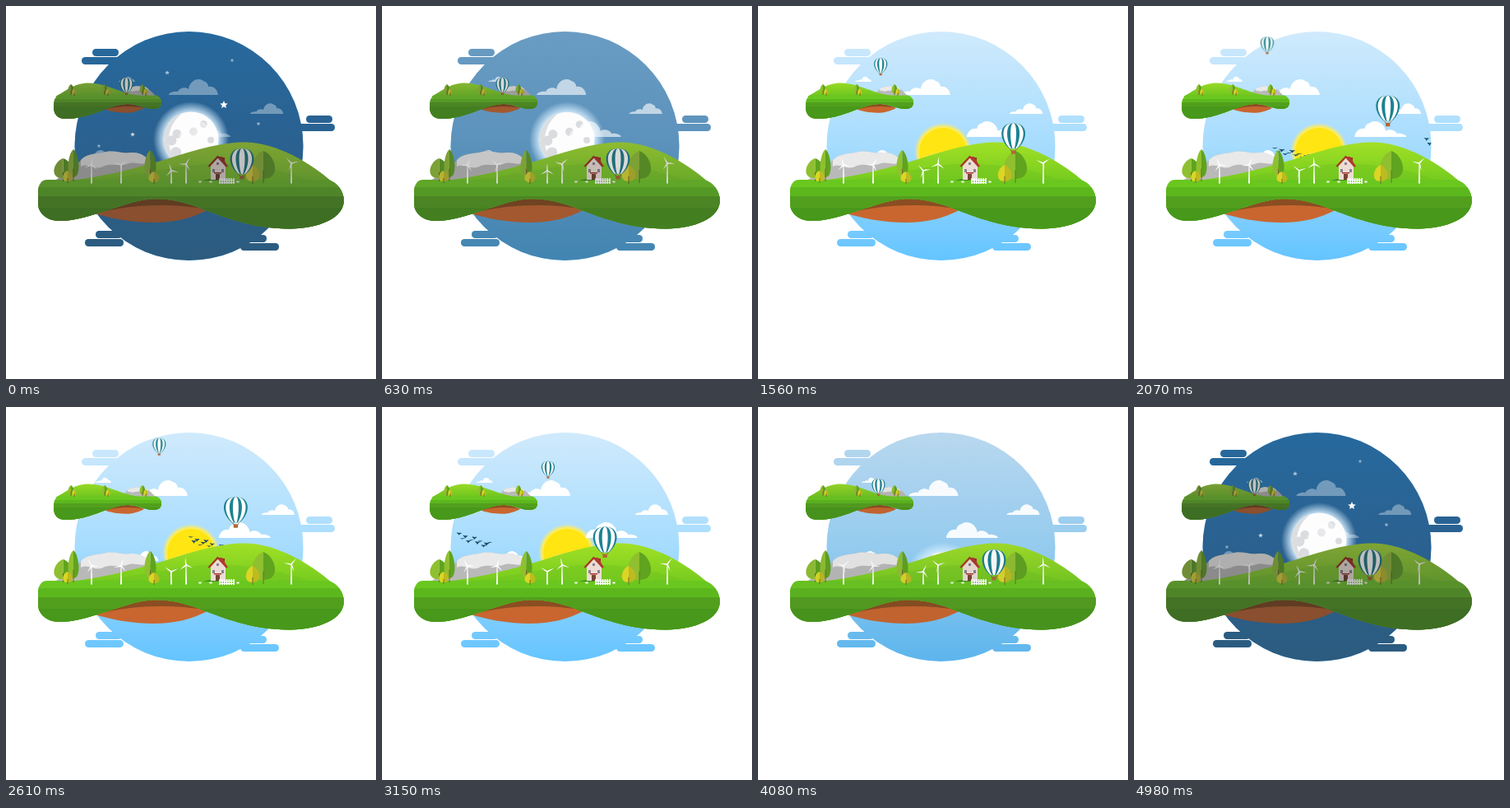
An HTML page that plays this animation: 450x453 px, repeating every 5010 ms.

```html
<!DOCTYPE html>
<html lang="en">
<head>
<meta charset="utf-8">
<title>Floating islands</title>
<style>
  html, body { margin: 0; height: 100%; overflow: hidden; background: #fff; }
  svg { display: block; width: 100%; height: 100%; }
</style>
</head>
<body>
<svg id="stage" viewBox="0 0 450 453"></svg>
<script>
const LOOP = 5010;
const stage = document.getElementById('stage');

// ---- Drawing helpers ----
const path = (d, fill, extra = '') => `<path d="${d}" fill="${fill}" ${extra}/>`;
const rect = (x, y, w, h, fill, extra = '') =>
  `<rect x="${x}" y="${y}" width="${w}" height="${h}" fill="${fill}" ${extra}/>`;
const circle = (x, y, r, fill) => `<circle cx="${x}" cy="${y}" r="${r}" fill="${fill}"/>`;
const group = (id, body, extra = '') => `<g id="${id}" ${extra}>${body}</g>`;
const repeat = (n, make) => Array.from({ length: n }, (_, i) => make(i)).join('');
const frac = v => v - Math.floor(v);

const stops = colors => colors.map((c, i) =>
  `<stop offset="${i / (colors.length - 1)}" stop-color="${c}"/>`).join('');
const skyFade = (id, ...colors) =>
  `<linearGradient id="${id}" gradientUnits="userSpaceOnUse" x1="0" y1="31" x2="0" y2="309">${stops(colors)}</linearGradient>`;
const hillFade = (id, ...colors) =>
  `<linearGradient id="${id}" x1="0" y1="0" x2="0" y2="1">${stops(colors)}</linearGradient>`;
const glow = (id, color, from) =>
  `<radialGradient id="${id}"><stop offset="${from}" stop-color="${color}"/><stop offset="1" stop-color="${color}" stop-opacity="0"/></radialGradient>`;

// ---- Scenery ----
function tree(x, base, w, h, light, dark) {
  const low = base - h * .13;
  const side = s => `M${x} ${base - h}C${x + s * w * .6} ${base - h * .88} ${x + s * w * .95} ${low} ${x} ${low}Z`;
  return path(side(-1), light) + path(side(1), dark) + rect(x - .5, base - h * .4, 1, h * .4, '#7a6a22');
}
const green = (x, base, w, h) => tree(x, base, w, h, '#8fc02f', '#5fa31f');
const yellow = (x, base, w, h) => tree(x, base, w, h, '#dbd526', '#bdbb20');

const soil = ['#69c71f', '#5cb71d', '#529f1e', '#48981b'];
const layers = (clip, top, ...seams) => `<g clip-path="url(#${clip})">${
  soil.map((c, i) => rect(0, i ? seams[i - 1] : top, 450, 100, c)).join('')}</g>`;

const cloudShape =
  'M0 0C0-3 7-5 11-4C13-9 21-10 24-7C25-17 36-22 42-17C46-16 48-13 48-10C53-11 59-8 60 0Z';

// Alternating stripes are the envelope, narrowed step by step.
const balloonArt =
  [1, .84, .52, .24].map((s, i) =>
    path('M0 0C20 0 17 22 4.500 31H-4.500C-17 22-20 0 0 0Z', i % 2 ? '#fff' : '#1b8291', `transform="scale(${s} 1)"`)).join('') +
  path('M-4 31L-2.500 34M4 31L2.500 34', 'none', 'stroke="#6b4a30" stroke-width=".6"') +
  rect(-2.7, 33, 5.4, 4.5, '#b0683a', 'rx="1"');

const mountain =
  path('M58 213C72 203 84 196 92 186C100 178 112 180 122 177C134 175 142 180 152 178C166 177 172 186 182 192L205 213Z', '#b9b9b9') +
  path('M91 187C100 178 112 180 122 177C134 175 142 180 152 178C164 177 170 183 176 189C166 195 158 189 150 191C138 196 128 190 118 195C108 200 100 190 91 195Z', '#e9e9e9');

const house =
  path('M240 212C246 209 266 209 272 212Z', '#3f8f1d') +
  rect(263, 184, 3, 7, '#9b2f25') +
  path('M249 211V194L258 184.500L267 194V211Z', '#ecdcd4') +
  path('M246.500 195L257.500 183L269 195', 'none', 'stroke="#ad3329" stroke-width="2.200"') +
  path('M257 183L263 183L269.500 194.500L267 195Z', '#b13a2e') +
  rect(251, 198, 3, 4, '#8a8492') + rect(262, 198, 3, 4, '#8a8492') + rect(256, 190, 3, 3, '#8a8492') +
  rect(253, 202, 9, 1.5, '#ad3329') + rect(255, 204, 5, 7, '#774536');

const fence = rect(259, 211, 19, 1, '#fff') + rect(259, 214, 19, 1, '#fff') +
  repeat(7, i => rect(259.3 + i * 2.8, 209, 1.7, 7, '#fff'));
const stones = repeat(3, i =>
  `<ellipse cx="${236 + i * 13 + (i > 1) * 20}" cy="213.500" rx="2" ry="1.200" fill="#e5edcf"/>`);

const mills = [[104, 193], [140, 193], [201, 200], [219, 192], [347, 191]];
const blade = i => path('M-.7 0L-.9 -3L0 -9.500L.8 0Z', '#fff', `transform="rotate(${i * 120})"`);
const millArt = mills.map(([x, y], i) =>
  path(`M${x - .5} ${y}h1l.5 ${215.500 - y}h-2Z`, '#fff') +
  group('mill' + i, repeat(3, blade) + circle(0, 0, 1.2, '#fff'))).join('');

const bigBody = 'M50 211H392C404 214 411 226 411 236C411 258 380 270 346 270.500C300 271 262 255 240 247C215 237 190 231 165 236C135 242 95 261 66 261C48 261 39 250 39 240V226C39 217 43 211 50 211Z';
const smallBody = 'M64 106.500H183C187 108 189 111 189 115C189 121 185 123 179 123C168 123 162 117 148 117C126 117 104 135 73 135C62 135 58 129 58 120C58 112 60 108 64 106.500Z';
const dirt =
  path('M108 252C140 240 160 233 185 233C210 233 230 240 247 247C225 258 205 263 180 263C150 263 125 257 108 252Z', '#c9662f') +
  path('M108 252C140 238 160 232 185 233C210 233 230 240 247 247C205 240 160 239 108 252Z', '#8a4e22');

const bigIsland = mountain +
  path('M55 214C105 211 155 198 195 186C235 173 265 165 293 165.500C330 167 370 190 397 214Z', 'url(#hill)') +
  path('M62 214C140 212 190 196 240 192C300 188 350 205 380 214Z', '#70c21f', 'opacity=".45"') +
  dirt + layers('bigClip', 205, 220, 231, 245) +
  green(69.5, 213, 19, 28) + green(82, 213, 11, 39) + yellow(75, 215, 10, 15) +
  green(175.5, 213, 12, 38) + yellow(180, 216, 11, 15) +
  green(313, 215, 24, 39) + yellow(300, 216, 14, 23) +
  house + fence + stones + millArt;

const smallIsland =
  `<g transform="translate(120.600 37) scale(.3 .33)">${mountain}</g>` +
  path('M60 108C72 102 82 91.500 101 91.500C122 92 136 103 165 107.500Z', 'url(#smallHill)') +
  `<g transform="translate(84 33) scale(.34 .36)">${dirt}</g>` +
  layers('smallClip', 103, 111, 115, 120) +
  [79, 120, 166].map(x => green(x, 106, 6, 13) + yellow(x + 4, 107, 4.5, 9)).join('');

// Each ribbon pair: lower x and width, upper x, and the top edge.
const ribbons = [[92, 46, 105, 52], [350, 50, 365, 133], [96, 47, 109, 273], [285, 47, 285, 278]];
const pill = (x, y, w, fill) => rect(x, y, w, 9, fill, 'rx="4.500"');
const sky = fill => circle(222.5, 170, 139, fill) + ribbons.map(([x, w, upper, y]) =>
  pill(upper, y, 32, fill) + pill(x, y + 10, w, fill)).join('');

const stars = [[265, 120, 5], [196, 81, 3], [275, 66, 2.5], [154, 156, 3], [307, 143, 2.5], [113, 170, 2.5]];
const starPath = r => 'M' + Array.from({ length: 10 }, (_, i) => {
  const a = i * Math.PI / 5, q = i % 2 ? r * .45 : r;
  return (q * Math.sin(a)).toFixed(2) + ' ' + (-q * Math.cos(a)).toFixed(2);
}).join('L') + 'Z';
const starArt = stars.map(([x, y, r], i) =>
  path(starPath(r), '#fff', `id="star${i}" transform="translate(${x} ${y})"`)).join('');

const flock = id => group(id, repeat(11, i =>
  `<g transform="translate(${2 + i * 3.7} ${2 + i * .9 + 8 * frac(i * .618)})">${
    path('M-2.500 -1.800Q-.5 -1 0 .8Q1 -1 2.800 -1.500', '#174663', 'class="bird" stroke="#174663" stroke-width="1.100"')}</g>`));

const moonArt = circle(0, 0, 46, 'url(#moonGlow)') + circle(0, 0, 33.5, '#fdfdfd') +
  path('M-10 -32A33.500 33.500 0 0 0 -14 30.400A40 40 0 0 1 -10 -32Z', '#dcdee0') +
  repeat(8, i => circle(24 * Math.cos(i * 2.4 + 3), 24 * Math.sin(i * 2.4 + 3) * (i % 3 ? 1 : .4), 2.5 + 4 * frac(i * .618 + .9), '#dadcdf'));

stage.innerHTML = `<defs>
  ${skyFade('day', '#d0eafc', '#a6dcfe', '#64c4ff')}
  ${skyFade('night', '#27699d', '#2a6190', '#2c5b7e')}
  ${hillFade('hill', '#a2e026', '#74cb1e')}${hillFade('smallHill', '#98da25', '#6cc51e')}
  ${glow('moonGlow', '#d8efff', .68)}${glow('sunGlow', '#fbec62', .86)}
  <clipPath id="air"><path d="M83.500 212V170A139 139 0 0 1 361.500 170V212Z"/></clipPath>
  <clipPath id="bigClip"><path d="${bigBody}"/></clipPath>
  <clipPath id="smallClip"><path d="${smallBody}"/></clipPath>
</defs>` + sky('url(#day)') + group('dark', sky('url(#night)')) +
  `<g clip-path="url(#air)">` + group('stars', starArt) +
  group('sun', circle(0, 0, 35, 'url(#sunGlow)') + circle(0, 0, 29, '#ffe512')) +
  group('moon', moonArt) +
  group('clouds', repeat(5, i => path(cloudShape, '#fff', `id="cloud${i}"`))) +
  flock('flock0') + flock('flock1') + '</g>' +
  group('land', bigIsland + `<g transform="translate(0 2)">${smallIsland}</g>` +
    group('bigBalloon', balloonArt) + group('smallBalloon', balloonArt));

// ---- Motion ----
const $ = id => document.getElementById(id);
const move = (id, x, y, rest = '') => $(id).setAttribute('transform', `translate(${x} ${y}) ${rest}`);
const clamp = v => Math.min(1, Math.max(0, v));
const ramp = (t, from, to) => clamp((t - from) / (to - from));
const easeOut = u => Math.sin(u * Math.PI / 2);
const window01 = (t, a, b, c, d) => easeOut(ramp(t, a, b)) - easeOut(ramp(t, c, d));
const drift = (t, peak = LOOP / 2) => Math.min(t / peak, (LOOP - t) / (LOOP - peak));

function draw(t) {
  const night = 1 - ramp(t, 330, 1080) + ramp(t, 3980, 4730);
  $('dark').style.opacity = night;
  $('stars').style.opacity = ramp(night, .65, 1);
  stars.forEach(([, , r], i) =>
    $('star' + i).style.opacity = clamp(r / 4) * (.85 + .15 * Math.cos(t / LOOP * Math.PI * 12 + i * 2)));
  $('land').style.filter = `brightness(${1 - .25 * night}) saturate(${1 - .2 * night})`;

  move('sun', 225, 217 - 40 * window01(t, 700, 1500, 3300, 3900));
  move('moon', 225, 162 + 60 * window01(t, 630, 1000, 4010, 4560));

  const swing = drift(t);
  $('clouds').style.opacity = 1 - .65 * night;
  move('cloud0', 198 - 38.8 * swing, 108);
  move('cloud1', 297 + 14.5 * swing, 131, 'scale(.67)');
  move('cloud2', 273 + 59 * drift(t, 2100), 159, 'scale(-1.050 1)');
  move('cloud3', 137 - 30 * swing, 92, 'scale(.33)');
  move('cloud4', 92 + 58 * swing, 187, 'scale(.63)');

  const flown = (t - 2070) * .2426;
  move('flock0', 169 - flown, 171, 'scale(1.150 .8)');
  move('flock1', 354 - flown, 160 - flown * .03);
  document.querySelectorAll('.bird').forEach((bird, i) =>
    bird.setAttribute('transform', `scale(1 ${.7 + .4 * Math.cos(t / LOOP * Math.PI * 50 + i * 2)})`));

  // Both balloons share one flight: up, across and back to rest.
  const u = ramp(t, 900, 3770), lift = Math.sin(Math.PI * u) ** 2;
  move('bigBalloon', 287 + lift * (93 - 170 * u), 173 - 70 * lift);
  move('smallBalloon', 146.5 + 602 * u ** 3.5 * (1 - u), 87 - 54 * lift, 'scale(.56)');

  mills.forEach(([x, y], i) => move('mill' + i, x, y, `rotate(${10 + i * 47 + t / LOOP * 1080})`));
}

const start = performance.now();
function tick() {
  draw((performance.now() - start) % LOOP);
  requestAnimationFrame(tick);
}
tick();
</script>
</body>
</html>
```
